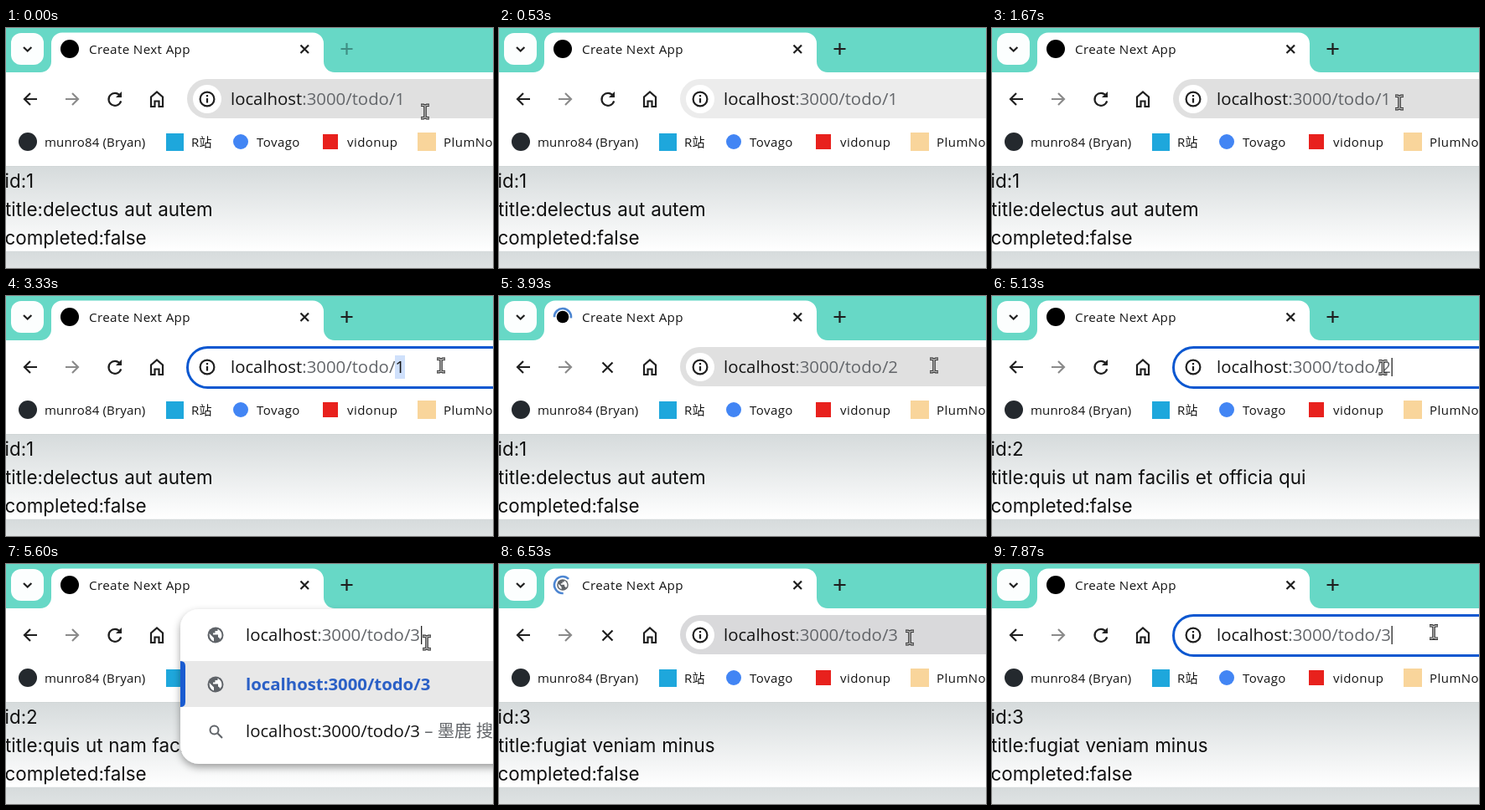
An HTML page for the animation above (8 s loop, 581 by 287 pixels).

```html
<!DOCTYPE html>
<html lang="en">
<head>
<meta charset="utf-8">
<title>Browser</title>
<style>
  html, body { margin: 0; width: 100%; height: 100%; overflow: hidden; background: #fff; }
  svg { display: block; width: 581px; height: 287px; }
  text { white-space: pre; fill: #141414; font-family: "Open Sans", "Noto Sans CJK SC", "Noto Sans CJK", sans-serif; }
  .label { font-size: 15.2px; letter-spacing: .37px; }
  .mark { font-size: 15px; letter-spacing: .15px; }
  .wide { letter-spacing: .45px; }
  .url { font-size: 20.35px; }
  .url .dim { fill: #63666a; }
  .url .picked { fill: #141414; }
  .hit { font-weight: 700; fill: #2b60c6; }
  .page text { font: 22.4px Inter, sans-serif; fill: #101010; word-spacing: .5px; }
  .line { fill: none; stroke: #1f1f1f; stroke-width: 2.2; }
  .grey { fill: none; stroke: #5f6368; stroke-width: 2; }
</style>
</head>
<body>
<svg viewBox="0 0 581 287">
  <defs>
    <linearGradient id="fade" x2="0" y2="1">
      <stop stop-color="#d6dbdc"/><stop offset="1" stop-color="#fff"/>
    </linearGradient>
    <filter id="shadow" x="-10%" y="-10%" width="120%" height="125%">
      <feDropShadow dx="0" dy="4" stdDeviation="5" flood-opacity=".36"/>
    </filter>
    <g id="globe">
      <circle r="9.5" fill="#5f6368"/>
      <path fill="#fff" d="M-7.4-2L-2 3.4V7.4Q-7.6 5.5-7.4-2ZM2.5-7.2Q8.5-4 7.2 2.4L5.2 5Q4.8 2.5 3 2.5V-.5H-3V-2.5H-.5V-5H2.5Z"/>
    </g>
  </defs>

  <g class="page">
    <rect y="166" width="581" height="100.8" fill="url(#fade)"/>
    <rect y="266.8" width="581" height="100.8" fill="url(#fade)"/>
    <text id="line0" x="-1.5" y="191"/>
    <text id="line1" x="-1" y="225"/>
    <text x="-1.5" y="258.6">completed:false</text>
  </g>

  <rect width="581" height="60" fill="#67d8c6"/>
  <path fill="#fff" d="M0 53H41A13 13 0 0 0 54 40V18.5A13 13 0 0 1 67 5.5H366A13 13 0 0 1 379 18.5V40A13 13 0 0 0 392 53H581V165H0Z"/>
  <path d="M0 165.5H581" stroke="#d0d6d6"/>

  <rect x="6" y="6" width="39" height="38" rx="12" fill="#fcfefe"/>
  <path class="line" d="M21 23L25.7 27.5L30.4 23"/>
  <circle id="favicon" cx="76" cy="25" r="11"/>
  <use id="tabGlobe" href="#globe" transform="translate(76 25) scale(.72)"/>
  <path id="spinner" fill="none" stroke="#4d86d2" stroke-width="2.6"/>
  <text class="label" x="99" y="31">Create Next App</text>
  <path class="line" d="M351.5 20.5L361 30M361 20.5L351.5 30"/>
  <path id="plus" class="line" d="M406.5 18V32M399.5 25H413.5"/>

  <path class="line" d="M37 85H22.5M29 78L22 85L29 92"/>
  <path class="line" style="stroke:#8b8b8b" d="M71 85H85.5M79 78L86 85L79 92"/>
  <g id="reload">
    <path class="line" d="M136 80.8A7.5 7.5 0 1 0 137.2 87.4"/>
    <path fill="#1f1f1f" d="M138 76V83H131Z"/>
  </g>
  <path id="stop" class="line" d="M123.5 79.5L135.5 91.5M135.5 79.5L123.5 91.5"/>
  <path class="line" d="M173 94V82.5L180 76.5L187 82.5V94H182.5V87.5H177.5V94Z"/>

  <rect id="field" x="216" y="61" width="500" height="47" rx="23.5"/>
  <rect id="ring" x="216.5" y="61.5" width="500" height="48" rx="24" fill="#fff" stroke="#0b57d0" stroke-width="3"/>
  <circle cx="240" cy="85" r="17" fill="#fff"/>
  <circle class="line" cx="240" cy="85" r="8.4"/>
  <path class="line" d="M240 84V89.5M240 80V82.2"/>
  <rect id="selection" x="464" y="71" width="12" height="28" fill="#cfe0fb"/>
  <text class="url" x="268" y="92">localhost<tspan class="dim">:3000/todo/<tspan id="digit" class="num"/></tspan></text>

  <circle cx="26" cy="136" r="11" fill="#24292e"/>
  <text class="mark" x="46" y="142">munro84 (Bryan)</text>
  <rect x="191" y="126" width="21" height="21" fill="#1ea7dc"/>
  <text class="mark" x="221" y="142">R站</text>
  <circle cx="280" cy="136" r="9" fill="#4285f4"/>
  <text class="mark wide" x="299" y="142">Tovago</text>
  <rect x="378" y="127" width="18" height="18" fill="#e8211d"/>
  <text class="mark wide" x="407" y="142">vidonup</text>
  <rect x="491" y="125" width="22" height="22" fill="#f9d59b"/>
  <text class="mark wide" x="522" y="142">PlumNodes</text>

  <g id="menu">
    <rect x="208" y="54" width="420" height="185" rx="22" fill="#fff" filter="url(#shadow)"/>
    <rect x="208" y="116" width="373" height="55" fill="#e8e8e8"/>
    <path fill="#1a5bd0" d="M208 116Q214 116 214 122V165Q214 171 208 171Z"/>
    <use href="#globe" x="250" y="85"/>
    <use href="#globe" x="250" y="144"/>
    <path class="grey" d="M252.5 202.5L258 208"/>
    <circle class="grey" cx="248.5" cy="198.5" r="5"/>
    <text class="url" x="286" y="92">localhost<tspan class="dim">:3000/todo/<tspan class="num"/></tspan></text>
    <text class="url hit" x="286" y="151">localhost:3000/todo/<tspan class="num"/></text>
    <text class="url" x="286" y="207">localhost:3000/todo/<tspan class="num"/><tspan class="dim"> – 墨鹿 搜索</tspan></text>
  </g>
  <rect id="caret" y="74" width="1.3" height="22" fill="#222"/>
  <g id="cursor" fill="none">
    <path stroke="#333" stroke-width="3.6" d="M-5-7.7H-2L0-6.7L2-7.7H5M-5 7.7H-2L0 6.7L2 7.7H5M0-7V7"/>
    <path stroke="#c4c4c4" stroke-width="1.3" d="M-4.5-7.7H-2L0-6.7L2-7.7H4.5M-4.5 7.7H-2L0 6.7L2 7.7H4.5M0-7V7"/>
  </g>
</svg>
<script>
const LOOP = 8000;
const $ = id => document.getElementById(id);
const nums = document.querySelectorAll('.num');
const titles = ['delectus aut autem', 'quis ut nam facilis et officia qui', 'fugiat veniam minus'];

// Pointer path: time, x, y
const path = [
  [70, 500, 100], [260, 525, 136], [500, 592, 100], [1000, 592, 98], [1470, 486, 89],
  [2130, 486, 89], [2450, 490, 117], [2800, 465, 84], [3000, 465, 84], [3130, 519, 83],
  [4870, 519, 83], [5070, 465, 85], [5200, 468, 86], [5400, 502, 94], [5870, 502, 94],
  [6470, 490, 88], [7270, 490, 88], [7340, 466, 83], [7470, 525, 82], [7660, 525, 82],
  [7670, 527, 81.5]
];

const within = (t, ...spans) => spans.some(([a, b]) => t >= a && t < b);
const show = (id, on) => $(id).setAttribute('visibility', on ? 'visible' : 'hidden');
const stage = (t, a, b) => t < a ? 1 : t < b ? 2 : 3;

function pointer(t) {
  const i = path.findIndex(p => p[0] > t);
  if (i === 0) return path[0].slice(1);
  if (i < 0) return path[path.length - 1].slice(1);
  const [a, b] = [path[i - 1], path[i]];
  const k = (t - a[0]) / (b[0] - a[0]);
  return [1, 2].map(j => a[j] + (b[j] - a[j]) * k);
}

function arc(mid, half) {
  const at = deg => {
    const r = deg * Math.PI / 180;
    return `${76 + 10 * Math.cos(r)} ${25 + 10 * Math.sin(r)}`;
  };
  return `M${at(mid - half)}A10 10 0 ${half > 90 ? 1 : 0} 1 ${at(mid + half)}`;
}

function draw(t) {
  const typed = stage(t, 3400, 5470);
  const loaded = stage(t, 4070, 6200);
  const menu = within(t, [3400, 3930], [5470, 5870]);
  const focus = within(t, [2600, 3930], [4930, 5870], [7270, LOOP]);
  const selected = within(t, [3060, 3400], [5200, 5470], [7400, 7870]);
  const loading = within(t, [3930, 4670], [5870, 7070]);
  const globe = within(t, [6400, 6730]);

  nums.forEach(n => n.textContent = typed);
  $('line0').textContent = 'id:' + loaded;
  $('line1').textContent = 'title:' + titles[loaded - 1];

  const idle = within(t, [300, 1100], [2400, 2600]);
  $('field').setAttribute('fill', idle ? '#ececec' : t > 5870 ? '#d9d9db' : '#e0e0e0');
  show('ring', focus);
  show('menu', menu);
  show('selection', selected);
  $('digit').classList.toggle('picked', selected);
  show('caret', focus && !selected);
  $('caret').setAttribute('x', menu ? 495 : 476.5);

  show('reload', !loading);
  show('stop', loading);
  show('favicon', !globe);
  show('tabGlobe', globe);
  show('spinner', loading);
  $('favicon').setAttribute('r', loading ? 7.3 : 11);
  const s = t - (t < 5000 ? 3930 : 5870) - 200;
  $('spinner').setAttribute('d', arc(s * .435, 65 + 50 * Math.abs(Math.sin(s * Math.PI / 1000))));

  $('plus').style.stroke = t < 130 ? '#3f8f84' : '#1f1f1f';
  $('cursor').setAttribute('transform', `translate(${pointer(t)})`);
}

function tick() {
  draw(performance.now() % LOOP);
  requestAnimationFrame(tick);
}
tick();
</script>
</body>
</html>
```
